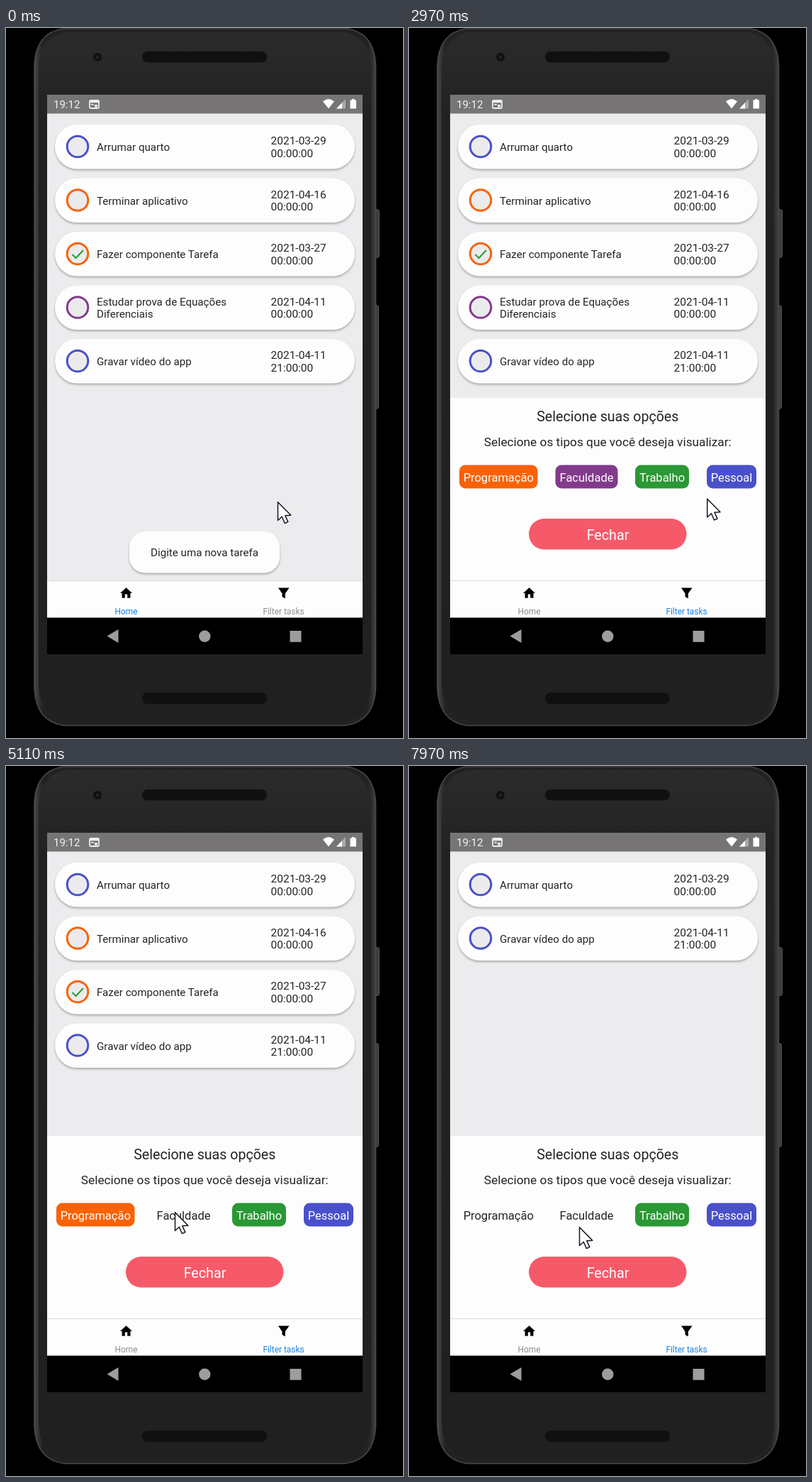
Write an HTML page that moves like this. It is 560x1000 px and loops after 8000 ms.

```html
<!DOCTYPE html>
<html lang="pt-BR">
<head>
<meta charset="utf-8">
<title>Lista de tarefas</title>
<style>
  html, body { margin: 0; width: 100%; height: 100%; overflow: hidden; background: #000; }
  svg { display: block; width: 560px; height: 1000px; font-family: Roboto, sans-serif; }
  text { fill: #242424; white-space: pre; }
  .mid { text-anchor: middle; }
  .lift { filter: drop-shadow(0 2px 1.6px rgba(0, 0, 0, .27)); }
</style>
</head>
<body>
<svg viewBox="0 0 560 1000">
  <defs>
    <linearGradient id="shell" x2="1" y2="0">
      <stop offset="0" stop-color="#484848"/>
      <stop offset=".012" stop-color="#343434"/>
      <stop offset=".025" stop-color="#222"/>
      <stop offset=".975" stop-color="#222"/>
      <stop offset=".99" stop-color="#303030"/>
      <stop offset="1" stop-color="#444"/>
    </linearGradient>
    <linearGradient id="face" x2="0" y2="1">
      <stop offset="0" stop-color="#2b2b2b"/>
      <stop offset=".12" stop-color="#222"/>
      <stop offset="1" stop-color="#202020"/>
    </linearGradient>
    <clipPath id="view"><rect x="58" y="120" width="445" height="658"/></clipPath>
  </defs>

  <!-- phone -->
  <rect width="560" height="1000"/>
  <g fill="#3c3c3c" stroke="#555" stroke-width="1">
    <rect x="517" y="255.5" width="9.5" height="68" rx="3"/>
    <rect x="517" y="390.5" width="8.5" height="146" rx="3"/>
  </g>
  <path fill="url(#shell)" stroke="#474747" stroke-width="1.6"
    d="M40 52Q42 7 80 1H482Q519 7 521.500 52V930Q519 977 478 982.500H82Q42 977 40 930Z"/>
  <path fill="url(#face)"
    d="M46 54Q48 13 84 6H478Q513 13 515 54V926Q513 971 474 977H86Q48 971 46 926Z"/>
  <g fill="#101010">
    <circle cx="129" cy="41" r="6"/>
    <rect x="192" y="33" width="176" height="15.500" rx="7.700"/>
    <rect x="192" y="936" width="176" height="16" rx="8"/>
  </g>
  <circle cx="129" cy="41" r="2.500" fill="#222"/>

  <!-- screen -->
  <rect x="58" y="94" width="445" height="788"/>
  <rect x="58" y="120" width="445" height="658" fill="#ecebed"/>
  <rect x="58" y="94" width="445" height="26.500" fill="#767474"/>
  <g fill="#fff">
    <text x="67" y="112.500" font-size="15" style="fill:#f4f4f4">19:12</text>
    <path fill="none" stroke="#eee" stroke-width="1.800" d="M119.500 102H129.500Q131 102 131 103.500V111.500Q131 113 129.500 113H119.500Q118 113 118 111.500V103.500Q118 102 119.500 102Z"/>
    <path fill="#eee" d="M118 102h13v3.200h-13zM120 107h4v1.500h-4zM125 108h4v3.500h-4z"/>
    <path d="M447 103.500Q455 96.500 463 103.500L455 113.500Z"/>
    <path fill="#aaa" d="M466 113.500L479 100V113.500Z"/>
    <path d="M466 113.500L474 105.200V113.500Z"/>
    <path d="M485.500 101.500H488V100H491.500V101.500H494V113.500H485.500Z"/>
  </g>

  <g id="list"></g>

  <g id="entry">
    <rect class="lift" x="174" y="709" width="212" height="58.500" rx="22" fill="#fdfdfd"/>
    <text class="mid" x="280" y="743.500" font-size="15.150">Digite uma nova tarefa</text>
  </g>
  <g id="fab">
    <circle cx="416.200" cy="691.500" r="32.500" fill="#fa8709"/>
    <g fill="none" stroke="#1c1204" stroke-width="2.300">
      <path d="M417 702.500L409.500 698.500V691.500L403.500 681H423.500L417.500 691.500V694"/>
      <path d="M420 700H431.500M425.700 694.300V705.700"/>
    </g>
  </g>

  <g clip-path="url(#view)">
    <g id="panel">
      <rect x="58" y="521" width="445" height="262" fill="#fdfdfd"/>
      <text class="mid" x="280.300" y="554" font-size="19.600">Selecione suas opções</text>
      <text class="mid" x="280.300" y="589" font-size="17.250">Selecione os tipos que você deseja visualizar:</text>
      <g id="chips"></g>
      <rect x="169" y="691" width="222.500" height="43.500" rx="21.700" fill="#f65a69"/>
      <text class="mid" x="280.500" y="720.500" font-size="19.700" style="fill:#fff">Fechar</text>
    </g>
  </g>

  <!-- tabs and navigation -->
  <rect x="58" y="778" width="445" height="52.500" fill="#fdfdfd"/>
  <rect x="58" y="778" width="445" height="1" fill="#d9d9d3"/>
  <path transform="translate(159.300 785.700) scale(.85)" d="M10 20v-6h4v6h5v-8h3L12 3 2 12h3v8z"/>
  <path d="M384 788.500H399.500L393.800 796.500V803.500L389.500 801V796.500Z"/>
  <text class="mid" id="home" x="169.500" y="825.500" font-size="11.900">Home</text>
  <text class="mid" id="filter" x="391.500" y="825.500" font-size="11.900">Filter tasks</text>
  <g fill="#9d9d9d">
    <path d="M142.500 856.500L158.500 847V866Z"/>
    <circle cx="280.300" cy="856.700" r="8.200"/>
    <rect x="400.500" y="849" width="16" height="15.800"/>
  </g>

  <path id="cursor" fill="#fff" stroke="#15151f" stroke-width="1.500" stroke-linejoin="round"
    d="M.5.8V26.500L6.300 21.300L10.300 30.500L14.800 28.600L10.800 19.700L18.800 19.200Z"/>
</svg>

<script>
const LOOP = 8000;
const BLUE = '#4a50c9', ORANGE = '#f96206', PURPLE = '#833a8c', GREEN = '#2a9834';
const $ = id => document.getElementById(id);

// [title lines, date, hour, colour, done]
const tasks = [
  [['Arrumar quarto'], '2021-03-29', '00:00:00', BLUE],
  [['Terminar aplicativo'], '2021-04-16', '00:00:00', ORANGE],
  [['Fazer componente Tarefa'], '2021-03-27', '00:00:00', ORANGE, true],
  [['Estudar prova de Equações', 'Diferenciais'], '2021-04-11', '00:00:00', PURPLE],
  [['Gravar vídeo do app'], '2021-04-11', '21:00:00', BLUE]
];

// [label, x, width, colour, press, release, list update]
const chips = [
  ['Programação', 71, 110.5, ORANGE, 5840, 5990, 6080],
  ['Faculdade', 206.5, 88, PURPLE, 4600, 4750, 4850],
  ['Trabalho', 319, 76, GREEN],
  ['Pessoal', 420, 70, BLUE]
];

// [start, end, x, y]: the pointer reaches x, y at end
const moves = [
  [0, 0, 383, 667],
  [250, 850, 400, 798],
  [1400, 1950, 422, 664],
  [2900, 3700, 341, 596],
  [3800, 4400, 238, 628],
  [5250, 5750, 168, 628],
  [6500, 7300, 240, 649]
];
const TAB_AT = 950, PANEL_AT = 2400, PANEL_MS = 400, PANEL_H = 257;

const label = (x, y, s, size = 15.15) => `<text x="${x}" y="${y}" font-size="${size}">${s}</text>`;

$('list').innerHTML = tasks.map(([lines, date, hour, color, done]) => `<g>
  <rect class="lift" x="69" y="136" width="423" height="62.5" rx="31.2" fill="#fdfdfd"/>
  <circle cx="101" cy="167" r="14.8" fill="#ebebee" stroke="${color}" stroke-width="3"/>
  ${done ? `<path d="M93.5 168L98.500 173L109 162" fill="none" stroke="${GREEN}" stroke-width="2"/>` : ''}
  ${lines.map((s, i) => label(128, (lines.length > 1 ? 164 : 173) + i * 17.8, s)).join('')}
  ${label(373.5, 164, date, 15.5)}${label(373.5, 181.8, hour, 15.5)}
</g>`).join('');

$('chips').innerHTML = chips.map(([name, x, w]) => `<g>
  <rect x="${x}" y="615.5" width="${w}" height="33" rx="8.500"/>
  <text class="mid" x="${x + w / 2}" y="638.500" font-size="16.500">${name}</text>
</g>`).join('');

const rows = [...$('list').children], tags = [...$('chips').children];
const clamp = v => Math.min(1, Math.max(0, v));
const ease = v => v * v * (3 - 2 * v);
const show = (el, on) => el.setAttribute('visibility', on ? 'visible' : 'hidden');
const shift = (el, x, y) => el.setAttribute('transform', `translate(${x} ${y})`);

function pointer(t) {
  let [, , x, y] = moves[0];
  for (const [start, end, tx, ty] of moves.slice(1)) {
    const k = ease(clamp((t - start) / (end - start)));
    x += (tx - x) * k;
    y += (ty - y) * k;
  }
  return [x, y];
}

function drawChip(el, [, , , color, press = Infinity, release = Infinity], t) {
  const on = t < release;
  const fade = on ? 1 - .8 * ease(clamp((t - press) / 150))
                  : .2 + .8 * ease(clamp((t - release) / 250));
  el.setAttribute('opacity', fade);
  el.firstElementChild.setAttribute('fill', on ? color : 'none');
  el.lastElementChild.style.fill = on ? '#fff' : '#242424';
}

function draw(t) {
  const hidden = chips.filter(c => t >= c[6]).map(c => c[3]);
  let n = 0;
  rows.forEach((row, i) => {
    const on = !hidden.includes(tasks[i][3]);
    show(row, on);
    if (on) shift(row, 0, 75.5 * n++);
  });
  tags.forEach((el, i) => drawChip(el, chips[i], t));

  const filtering = t >= TAB_AT;
  show($('entry'), !filtering);
  show($('fab'), filtering);
  $('home').style.fill = filtering ? '#8e8e93' : '#1683e8';
  $('filter').style.fill = filtering ? '#1683e8' : '#8e8e93';

  const rise = clamp((t - PANEL_AT) / PANEL_MS);
  show($('panel'), rise > 0);
  shift($('panel'), 0, PANEL_H * (1 - rise) ** 3);
  shift($('cursor'), ...pointer(t));
}

const t0 = performance.now();
function tick() {
  draw((performance.now() - t0) % LOOP);
  requestAnimationFrame(tick);
}
tick();
</script>
</body>
</html>
```
